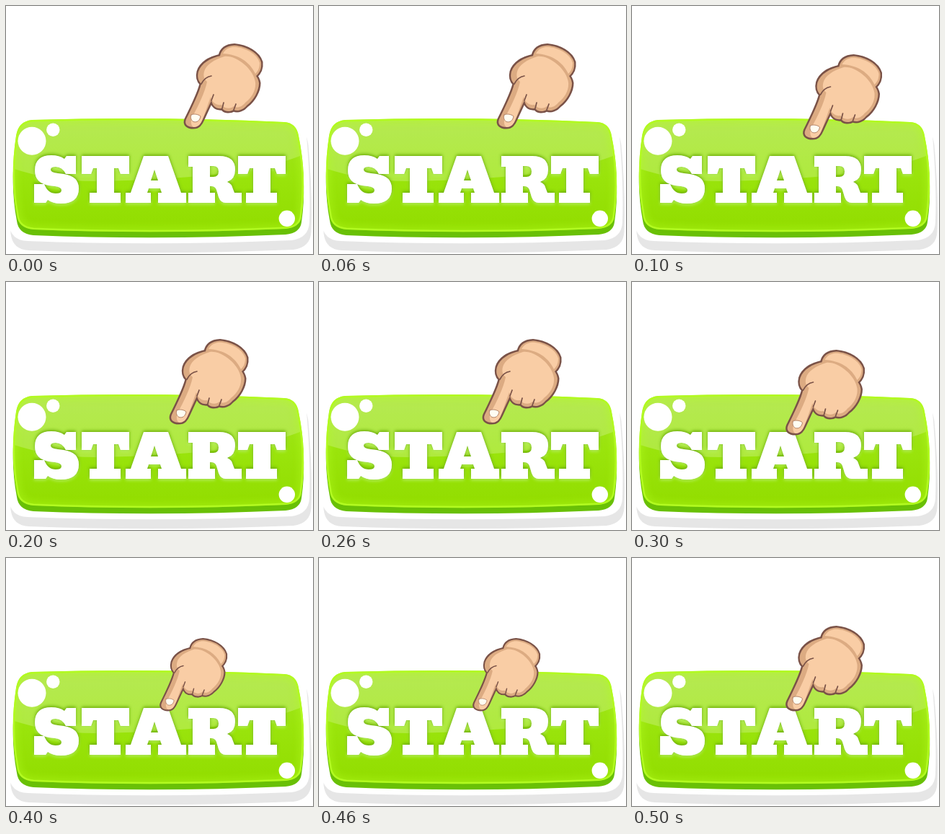
An HTML page with a canvas that plays this animation: 426 px wide and 344 px high, repeating every 600 ms.

```html
<!DOCTYPE html>
<html lang="en">
<head>
<meta charset="utf-8">
<title>Start button</title>
<style>
  html, body { margin: 0; width: 100%; height: 100%; overflow: hidden; background: #fff; }
  canvas { display: block; width: 426px; height: 344px; }
</style>
</head>
<body>
<canvas id="stage" role="img" aria-label="START">START</canvas>
<script>
const W = 426, H = 344, STEP = 100;
const canvas = document.getElementById('stage');
const ctx = canvas.getContext('2d');
const dpr = window.devicePixelRatio || 1;
canvas.width = W * dpr;
canvas.height = H * dpr;

const button = {
  plate: new Path2D(
    'M30 152H395Q414 155 417 180Q423 250 421 300Q420 322 396 325' +
    'Q210 333 30 326Q6 325 4 302Q3 250 10 180Q12 155 30 152Z'),
  face: new Path2D(
    'M36 158Q210 153 386 161Q403 162 406 180Q418 238 410 292Q408 307 388 309' +
    'Q210 317 38 310Q17 308 15 290Q5 238 14 180Q17 160 36 158Z'),
  gloss: new Path2D('M0 140H426V200Q390 218 330 229Q240 241 130 243Q60 244 0 222Z')
};

const T = 'M105 208H171V233H159L156 225H150V259H159V273H116V259H126V225H121L118 233H105Z';
const letters = new Path2D(
  'M97 208V233H83Q78 223 69 223Q62 223 62 227Q62 231 72 232L80 233Q101 236 101 253' +
  'Q101 274 76 274Q65 274 58 269L55 273H39V247H53Q58 260 69 260Q77 260 77 255.5' +
  'Q77 251 68 250L60 249Q40 246 40 228Q40 207 63 207Q74 207 81 212L84 208Z' + T +
  'M191 208H225L243 259H250V273H211V259H216L214 253H198L196 259H201V273H166V259H173Z' +
  'M206 227L201 242H211Z' +
  'M254 208H296Q318 208 318 227Q318 240 307 244Q313 246 315 254L317 259H327V273H305' +
  'Q298 273 295 265L292 255Q290 250 285 250H283V259H290V273H253V259H259V223H253V208Z' +
  'M283 222V237H288Q295 237 295 229.5Q295 222 288 222Z');
letters.addPath(new Path2D(T), new DOMMatrix().translate(217, 0));

const hand = {
  cuff: new Path2D('M297 69C299 60 306 55 317 54.500C334 56 350 65 354 78C355 87 352 93 346 98L325 98Z'),
  palm: new Path2D(
    'M298 69C284 72 271 79 267 91C265 99 267 104 271 108C268 120 260 137 250 157' +
    'C247 164 252 168 260 168C267 168 270 164 273 157L285 131C287 139 291 143 300 142' +
    'C303 147 311 147 316 144C322 147 330 143 334 138C344 131 351 117 351 107' +
    'C350 101 348 98 345 95C337 80 317 67 298 69Z'),
  light: new Path2D(
    'M303 70C289 74 277 82 275 91C273 99 276 102 279 105C276 120 267 138 258 155' +
    'C255 162 258 170 264 168C269 166 271 162 274 154L284 126C286 134 292 138 299 137' +
    'C304 143 312 143 316 139C323 143 329 138 332 134C341 127 347 117 346 106' +
    'C344 88 320 68 303 70Z'),
  cuffLight: new Path2D('M301 66C305 58 314 56 320 57C336 59 350 69 352 79C352 87 349 91 346 94C338 77 322 67 301 66Z'),
  lines: new Path2D('M271 108C274 102 279 98 285 97M285 131L288 123M300 142L302 134M316 144L319 136'),
  nail: new Path2D('M257 151C260 149 267 150 270 153C269 159 265 162 260 160.500C256 158 256 154 257 151Z')
};

function fill(path, color) {
  ctx.fillStyle = color;
  ctx.fill(path, 'evenodd');
}

function stroke(path, color, width) {
  ctx.strokeStyle = color;
  ctx.lineWidth = width;
  ctx.stroke(path);
}

function fillShifted(path, color, x, y) {
  ctx.save();
  ctx.translate(x, y);
  fill(path, color);
  ctx.restore();
}

function shadow(color, blur, x = 0, y = 0) {
  ctx.shadowColor = color;
  ctx.shadowBlur = blur * dpr;
  ctx.shadowOffsetX = x * dpr;
  ctx.shadowOffsetY = y * dpr;
}

function dot(x, y, r) {
  ctx.beginPath();
  ctx.arc(x, y, r, 0, Math.PI * 2);
  ctx.fillStyle = '#fff';
  ctx.fill();
}

function drawButton() {
  fillShifted(button.plate, '#e6e6e6', 2.5, 13);
  fill(button.plate, '#fff');
  fillShifted(button.face, '#69c006', 0, 8);

  ctx.save();
  ctx.clip(button.face);
  const g = ctx.createLinearGradient(0, 156, 0, 311);
  g.addColorStop(0, '#a2e324');
  g.addColorStop(0.5, '#9ae40c');
  g.addColorStop(1, '#92dd00');
  fill(button.face, g);
  fill(button.gloss, 'rgba(255,255,255,.21)');
  shadow('#b2fa20', 12);
  stroke(button.face, '#b2fa20', 5);
  ctx.restore();

  // Pressed-in lettering: dark above, light below
  ctx.save();
  shadow('#bdf56a', 4, 0, 2);
  fill(letters, '#fff');
  shadow('#66a800', 4, 0, -1.5);
  fill(letters, '#fff');
  ctx.restore();

  dot(36, 187.3, 19.5);
  dot(65.3, 171.7, 9.2);
  dot(389.8, 294.8, 11.2);
}

function drawHand(x, y, scale) {
  const ink = '#7a5247', skin = '#f9cda5', shade = '#dcab82';
  ctx.save();
  ctx.translate(x, y);
  ctx.scale(scale, scale);
  ctx.translate(-247, -170);
  ctx.lineJoin = ctx.lineCap = 'round';
  stroke(hand.cuff, ink, 5);
  stroke(hand.palm, ink, 5);
  fill(hand.cuff, shade);
  fill(hand.palm, shade);
  ctx.save();
  ctx.clip(hand.palm);
  fill(hand.light, skin);
  ctx.restore();
  fill(hand.cuffLight, skin);
  stroke(hand.lines, ink, 1.7);
  fill(hand.nail, '#fffdf2');
  stroke(hand.nail, '#b58468', 1);
  ctx.restore();
}

// Lower-left corner of the hand and its scale; the fifth pose is the press
const rest = [213.5, 212, 1];
const poses = [[247, 170, 1], [237.5, 185, 1], [227, 197, 1], rest, [213.5, 212, 0.855], rest];

function draw(now) {
  ctx.setTransform(dpr, 0, 0, dpr, 0, 0);
  ctx.fillStyle = '#fff';
  ctx.fillRect(0, 0, W, H);
  drawButton();
  drawHand(...poses[Math.floor(Math.max(0, now - start) / STEP) % poses.length]);
  requestAnimationFrame(draw);
}

const start = performance.now();
draw(start);
</script>
</body>
</html>
```
